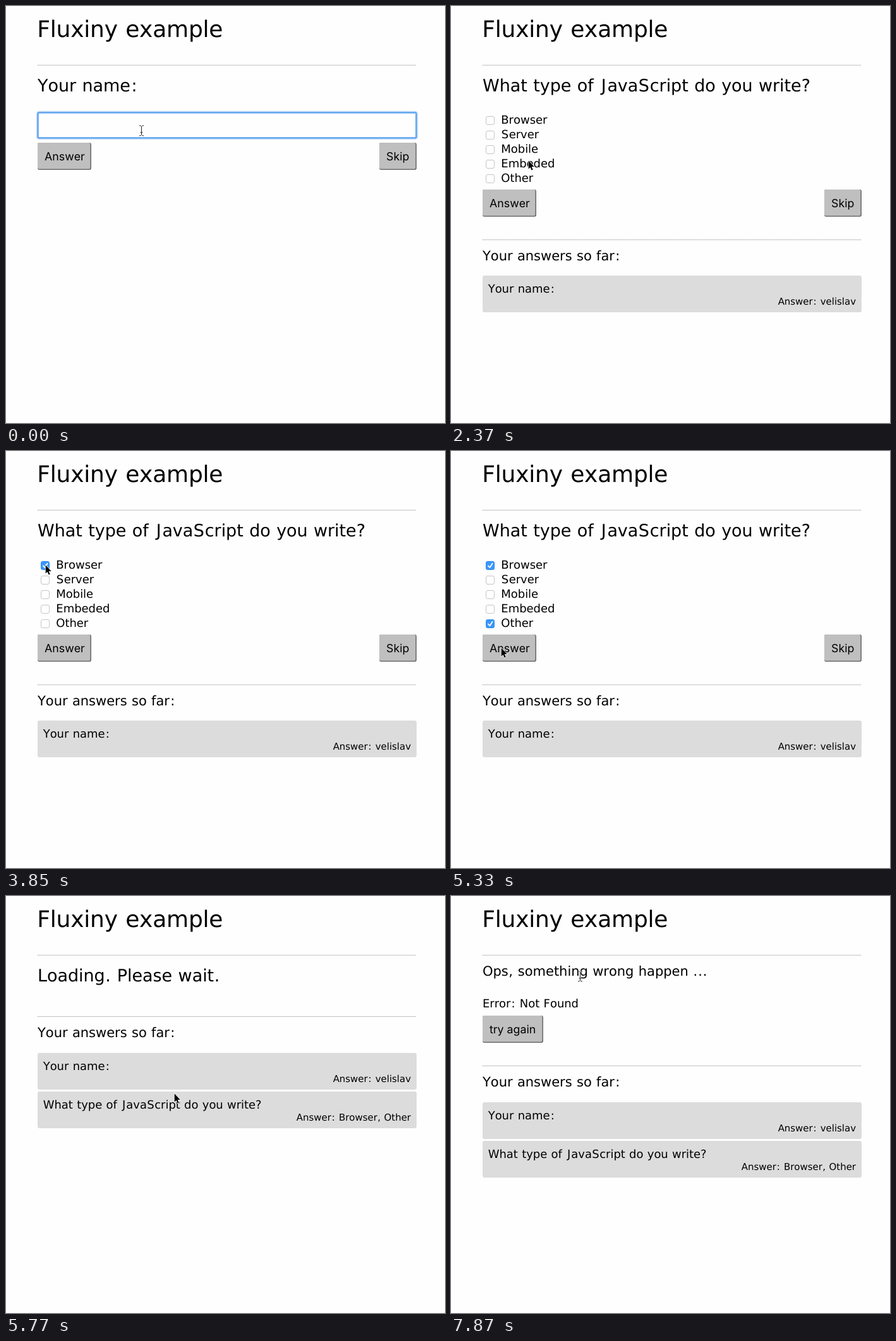
Write an HTML page that moves like this. It is 695 px wide and 659 px high and loops after 8000 ms.

```html
<!DOCTYPE html>
<html lang="en">
<head>
<meta charset="utf-8">
<title>Fluxiny example</title>
<style>
  html, body { margin: 0; width: 100%; height: 100%; overflow: hidden; background: #fefefe; }
  svg { display: block; width: 695px; height: 659px; }
  text {
    font: 18px "DejaVu Sans", Verdana, sans-serif;
    font-kerning: none;
    letter-spacing: -.002em;
    word-spacing: .034em;
    text-rendering: geometricPrecision;
    white-space: pre;
  }
  .h1 { font-size: 36px; letter-spacing: -.006em; }
  .h2 { font-size: 27px; }
  .h3 { font-size: 21.06px; }
  .small { font-size: 15px; text-anchor: end; }
  .ui { font-family: Inter, Roboto, sans-serif; font-size: 17.8px; letter-spacing: 0; word-spacing: 0; }
  .rule { stroke: #8a8a8a; stroke-dasharray: 1 1; }
  .card { fill: #dcdcdc; }
  .edge { fill: #6e6e6e; }
  .face { fill: #bfbfbf; }
  .ring { fill: none; stroke: #4a98ee; }
  .box { fill: #fff; stroke: #c6c6c6; }
  .tick { display: none; }
  .on .box { fill: #3b97fb; stroke: #2f8bf2; }
  .on .tick { display: inline; fill: none; stroke: #fff; stroke-width: 1.8; stroke-linecap: round; stroke-linejoin: round; }
</style>
</head>
<body>
<svg id="stage" viewBox="0 0 695 659"></svg>
<script>
const LOOP = 8000;
const NAME = 'velislav';
const QUESTION = 'What type of JavaScript do you write?';
const KINDS = ['Browser', 'Server', 'Mobile', 'Embeded', 'Other'];

// Glyphs narrower in DejaVu Sans than in Verdana: extra space before and after, in em.
const PAD = { J: [.1, .06], S: [.02, .03], ':': [.06, .055], '.': [.02, .025], ',': [.02, .025] };
const pad = s => s.replace(/[JS:.,]/g, c =>
  `<tspan dx="${PAD[c][0]}em" style="letter-spacing:${PAD[c][1]}em">${c}</tspan>`);

const text = (x, y, s, cls = '') =>
  `<text x="${x}" y="${y}" class="${cls}">${cls === 'ui' ? s : pad(s)}</text>`;

const rule = y => `<path class="rule" d="M50 ${y + .5}H650"/>`;

const rect = (x, y, w, h, r, cls, extra = '') =>
  `<rect x="${x}" y="${y}" width="${w}" height="${h}" rx="${r}" class="${cls}" ${extra}/>`;

const button = (x, y, w, label) =>
  rect(x, y, w, 43, 3, 'edge') +
  rect(x, y, w - 1.6, 41.4, 2.5, 'face') +
  text(x + 11, y + 28, label, 'ui');

const buttons = y => button(50, y, 85, 'Answer') + button(591, y, 59, 'Skip');

const card = (y, question, answer) =>
  rect(50, y, 600, 58, 3, 'card') +
  text(58.7, y + 27, question) +
  text(641, y + 46, 'Answer: ' + answer, 'small');

const answers = (lineY, cardY, count) =>
  rule(lineY) + text(50, lineY + 33, 'Your answers so far:', 'h3') +
  [['Your name:', NAME], [QUESTION, 'Browser, Other']].slice(0, count)
    .map(([q, a], i) => card(cardY + 61 * i, q, a)).join('');

const option = (label, i) => {
  const y = 23 * i;
  return `<g id="opt${i}">` +
    rect(55.5, 174.5 + y, 13, 13, 2.5, 'box') +
    `<path class="tick" d="M59 ${181.5 + y}l2.4 2.7 4.2-6.4"/></g>` +
    text(79.3, 186 + y, label);
};

const loading = text(50, 135, 'Loading. Please wait.', 'h2');
const ring = [[6, .16], [4, .3], [2, .85]].map(([w, a]) =>
  rect(50.5, 168.5, 599, 40, 2, 'ring', `stroke-width="${w}" stroke-opacity="${a}"`)).join('');

const scenes = {
  ask: text(50, 135, 'Your name:', 'h2') + ring +
    rect(52, 170, 596, 37, 0, '', 'fill="#fefefe"') +
    '<text id="typed" class="ui" x="60" y="195"></text>' +
    rect(0, 178, 1, 21, 0, '', 'id="caret"') + buttons(216),
  saving: loading + answers(190, 248, 1),
  pick: text(50, 135, QUESTION, 'h2') + KINDS.map(option).join('') +
    buttons(290) + answers(369, 426, 1),
  sending: loading + answers(190, 248, 2),
  fail: text(50, 126, 'Ops, something wrong happen ...', 'h3') +
    text(50, 176, 'Error: Not Found') + button(50, 189, 96, 'try again') +
    answers(268, 326, 2)
};

const stage = document.getElementById('stage');
stage.innerHTML =
  text(49.3, 49.4, 'Fluxiny example', 'h1') + rule(93) +
  Object.entries(scenes).map(([id, body]) => `<g id="${id}">${body}</g>`).join('') +
  `<g id="pointer">
    <path id="arrow" d="M.7 .3V13.6L3.6 10.9 5.6 15.6 7.7 14.7 5.7 10H9.7Z" stroke="#fff" stroke-width="1.4" paint-order="stroke"/>
    <g id="beam" fill="none">
      <path d="M-3-8Q0-8 .5-6.5 1-8 4-8M.5-6.5V6.5M-3 8Q0 8 .5 6.5 1 8 4 8M-1.5 3H2.5" stroke="#fff" stroke-width="2.4" stroke-opacity=".7"/>
      <path d="M-3-8Q0-8 .5-6.5 1-8 4-8M.5-6.5V6.5M-3 8Q0 8 .5 6.5 1 8 4 8M-1.5 3H2.5" stroke="#222"/>
    </g>
  </g>`;

const el = id => document.getElementById(id);
const show = (id, on) => el(id).setAttribute('display', on ? 'inline' : 'none');

// Timelines of held values: [start ms, ...value]
const sceneAt = [[0, 'ask'], [1770, 'saving'], [2370, 'pick'], [5470, 'sending'], [6070, 'fail']];
const typedAt = [[0, 0], [150, 2], [290, 5], [590, 8]];
const pointerAt = [
  [0, 214, 197, 'beam'], [1190, 204, 202, 'beam'], [1330, 166, 226, 'arrow'],
  [1480, 131, 241, 'arrow'], [1630, 122, 244, 'arrow'], [2520, 122, 245, 'beam'],
  [2960, 120, 240, 'beam'], [3110, 106, 220, 'arrow'], [3260, 86, 198, 'arrow'],
  [3400, 71, 186, 'arrow'], [3550, 63, 181, 'arrow'], [3700, 62, 180, 'arrow'],
  [4150, 62, 190, 'arrow'], [4300, 62, 226, 'arrow'], [4450, 63, 263, 'arrow'],
  [4590, 63, 274, 'arrow'], [5040, 66, 282, 'arrow'], [5190, 76, 304, 'arrow'],
  [5330, 79, 311, 'arrow'], [5620, 200, 315, 'arrow'], [5770, 266, 312, 'arrow'],
  [6820, 263, 288, 'arrow'], [6970, 240, 220, 'arrow'], [7120, 212, 152, 'arrow'],
  [7270, 204, 135, 'arrow'], [7870, 204, 127, 'beam']
];
const held = (line, t) => line.filter(k => k[0] <= t).pop().slice(1);

function draw(t) {
  const [scene] = held(sceneAt, t);
  for (const id in scenes) show(id, id === scene);

  const [count] = held(typedAt, t);
  const typed = el('typed');
  typed.textContent = NAME.slice(0, count);
  show('caret', count > 0);
  if (scene === 'ask' && count) {
    el('caret').setAttribute('x', Math.round(60 + typed.getComputedTextLength() - .5));
  }

  el('opt0').classList.toggle('on', t >= 3850);
  el('opt4').classList.toggle('on', t >= 4890);

  const [x, y, kind] = held(pointerAt, t);
  el('pointer').setAttribute('transform', `translate(${x} ${y})`);
  show('arrow', kind === 'arrow');
  show('beam', kind === 'beam');
}

const start = performance.now();
function tick() {
  draw((performance.now() - start) % LOOP);
  requestAnimationFrame(tick);
}
tick();
</script>
</body>
</html>
```
